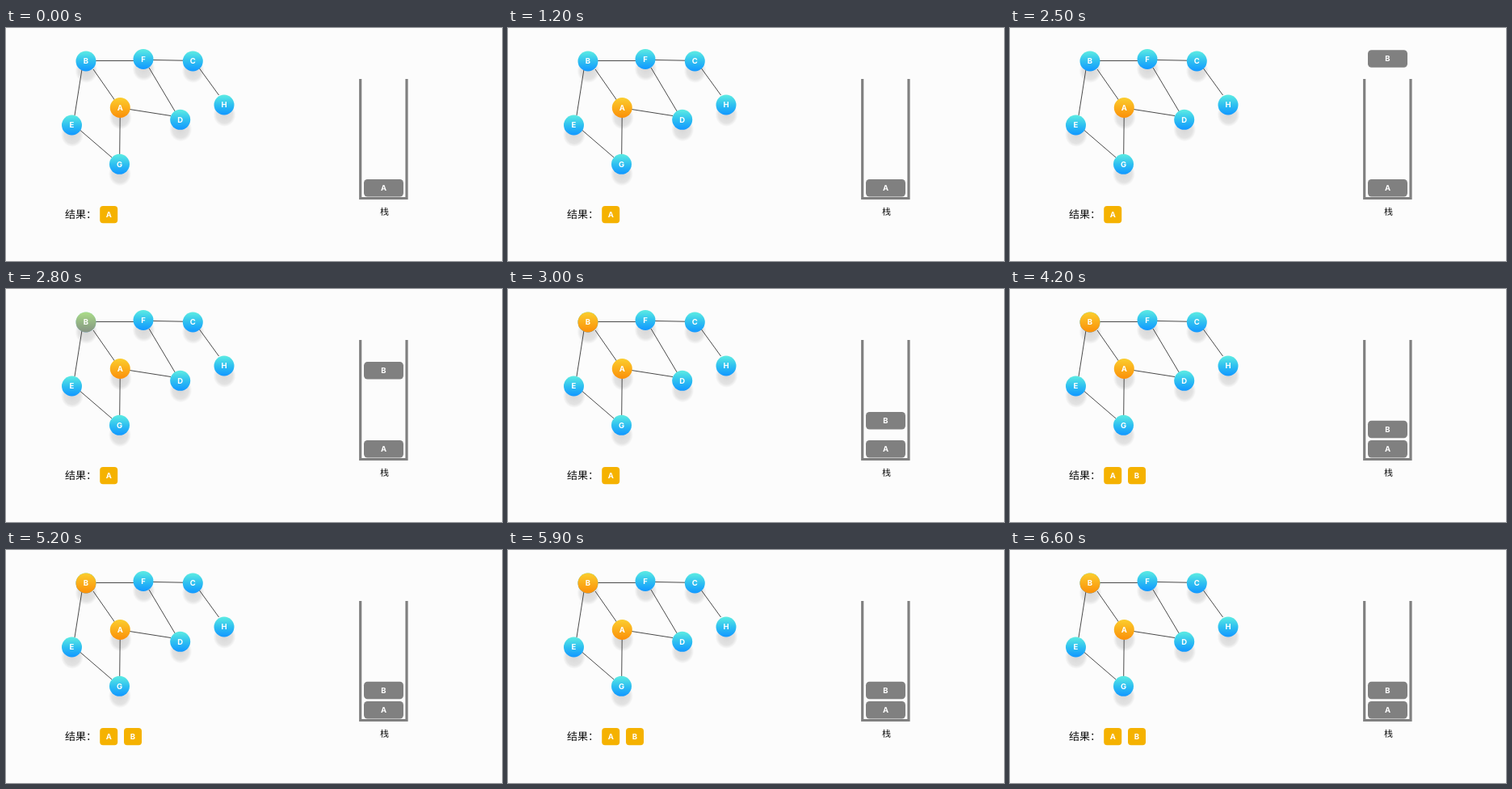
These frames come from a looping animation (614 px wide and 288 px high, 6700 ms). An HTML page:

```html
<!DOCTYPE html>
<html lang="zh">
<head>
<meta charset="utf-8">
<style>
html, body { margin: 0; height: 100%; overflow: hidden; background: #fcfcfc; }
svg { display: block; text-rendering: geometricPrecision; }
.letter { font: bold 9.5px Inter, "Liberation Sans", sans-serif; fill: #fff; text-anchor: middle; }
.label { font-family: "Noto Sans CJK SC", "Noto Sans CJK", sans-serif; fill: #111; }
</style>
</head>
<body>
<svg width="614" height="288" viewBox="0 0 614 288">
  <defs>
    <linearGradient id="blue" x2="0" y2="1">
      <stop offset="0.05" stop-color="#58e8e4"/><stop offset="0.5" stop-color="#2fc0f0"/><stop offset="0.95" stop-color="#149bff"/>
    </linearGradient>
    <linearGradient id="gold" x2="0" y2="1">
      <stop offset="0.05" stop-color="#fbcb2c"/><stop offset="0.95" stop-color="#fb920a"/>
    </linearGradient>
    <radialGradient id="shade">
      <stop offset="0" stop-color="#888" stop-opacity="0.32"/>
      <stop offset="0.7" stop-color="#888" stop-opacity="0.22"/>
      <stop offset="1" stop-color="#888" stop-opacity="0"/>
    </radialGradient>
  </defs>
  <g id="shadows"></g>
  <g id="edges" stroke="#4a4a4a" stroke-width="1"></g>
  <g id="nodes"></g>
  <path d="M438.7 63V210.5H496V63" fill="none" stroke="#808080" stroke-width="3.2"/>
  <g id="blocks"></g>
  <g id="results"></g>
  <text class="label" x="73" y="235.2" font-size="13">结果：</text>
  <text class="label" x="463" y="231" font-size="11">栈</text>
</svg>
<script>
const LOOP = 6700;
const spots = {
  A: [141.3, 98.5], B: [99, 41], C: [231.3, 41], D: [215.7, 113.3],
  E: [81.5, 120], F: [170, 38.5], G: [140.5, 168.3], H: [270, 95]
};
// Edges run from rim to rim: x1, y1, x2, y2.
const edges = [
  [111, 40.5, 158, 40.5], [182, 39.5, 219, 40.2], [239.5, 50, 263.5, 83],
  [177, 49, 209.5, 103.5], [108, 51, 134.5, 89], [94, 51, 85, 108],
  [92, 126.5, 131, 160], [153, 100.5, 204, 108.5], [141.2, 110, 140.7, 156]
];

const layer = id => document.getElementById(id);

function add(parent, tag, attrs, text = "") {
  const el = document.createElementNS("http://www.w3.org/2000/svg", tag);
  for (const key in attrs) el.setAttribute(key, attrs[key]);
  el.textContent = text;
  parent.append(el);
  return el;
}
const letter = (parent, x, y, name) => add(parent, "text", { class: "letter", x, y: y + 3.4 }, name);

function tile(parent, name, x, y, width, height, rx, fill) {
  const g = add(parent, "g", {});
  add(g, "rect", { x, y, width, height, rx, fill });
  letter(g, x + width / 2, y + height / 2, name);
  return g;
}

for (const [x1, y1, x2, y2] of edges) add(layer("edges"), "line", { x1, y1, x2, y2 });

let goldB;
for (const name in spots) {
  const [cx, cy] = spots[name];
  const disc = fill => add(layer("nodes"), "circle", { cx, cy, r: 12.5, fill: `url(#${fill})` });
  add(layer("shadows"), "ellipse", { cx: cx + 0.5, cy: cy + 12, rx: 14, ry: 15, fill: "url(#shade)" });
  disc(name === "A" ? "gold" : "blue");
  if (name === "B") goldB = disc("gold");
  letter(layer("nodes"), cx, cy, name);
}

const block = (name, y) => tile(layer("blocks"), name, 443, y, 49, 21.5, 4.5, "#808080");
const result = (name, x) => tile(layer("results"), name, x, 220, 22, 21.3, 4, "#f5b200");
block("A", 187);
const blockB = block("B", 27.3);
result("A", 116.2);
const resultB = result("B", 146);

const span = (t, from, to) => Math.min(1, Math.max(0, (t - from) / (to - from)));
const ease = p => p < 0.5 ? 2 * p * p : 1 - 2 * (1 - p) ** 2;

function draw(t) {
  blockB.setAttribute("opacity", span(t, 2150, 2400));
  blockB.setAttribute("transform", `translate(0 ${135.4 * ease(span(t, 2500, 3125))})`);
  goldB.setAttribute("opacity", span(t, 2600, 3000));
  resultB.setAttribute("opacity", span(t, 3650, 3950));
}

const start = performance.now();
function frame() {
  draw((performance.now() - start) % LOOP);
  requestAnimationFrame(frame);
}
frame();
</script>
</body>
</html>
```
